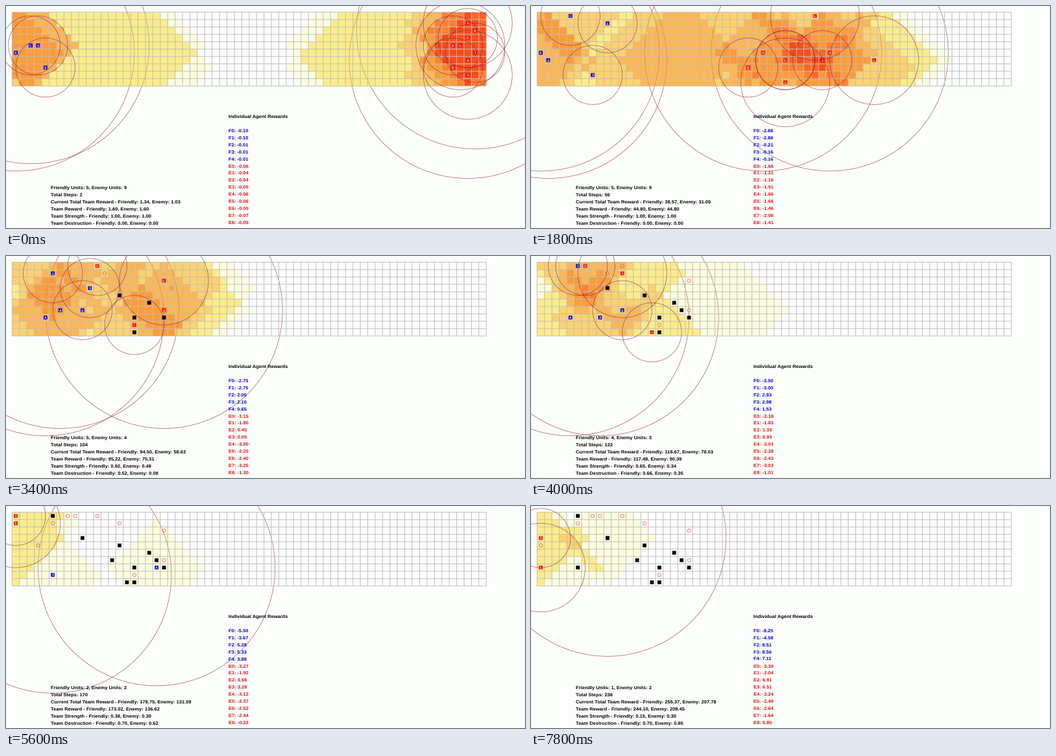
Write a matplotlib script that moves like this. It is 800x343 px and loops after 8 s.

```python
import numpy as np
import matplotlib.pyplot as plt
from matplotlib.animation import FuncAnimation
from matplotlib.collections import LineCollection
from matplotlib.patches import Circle, Rectangle

W, H, DPI = 800, 343, 100
PX = 72 / DPI
COLS, ROWS = 64, 10
X0, Y0, DX, DY = 9.4, 9.6, 11.42, 11.4
FRAMES, INTERVAL = 40, 200
KEYS = [0, 4, 9, 17, 24, 32, 39]

plt.rcParams["font.family"] = "Liberation Sans"
plt.rcParams["text.hinting"] = "none"

RING = {"A": 16, "L": 6, "C": 4, "S": 4, "I": 4}    # drawn circle, in cells
REACH = {"A": 6, "L": 8, "C": 6, "S": 22, "I": 6}   # heat diamond, in cells

BLUE, RED, WINE = "#0000d8", "#f01010", "#8f1a2e"


def heat_colors():
    """RGBA per overlap count: the most transparent colour giving the ramp."""
    n = np.arange(10)
    green = np.interp(n, [1, 2, 5, 8], [255, 237, 157, 78])
    blue = np.interp(n, [0, 1, 2, 5, 8], [255, 224, 139, 56, 24])
    rgb = np.stack([np.full(10, 255), green, blue], axis=1) / 255
    alpha = 1 - rgb.min(axis=1, keepdims=True)
    base = (rgb - (1 - alpha)) / np.maximum(alpha, 1e-9)
    return np.hstack([np.clip(base, 0, 1), alpha])


LUT = heat_colors()


def cell(c, r):
    return X0 + DX * (c + 0.5), Y0 + DY * (r + 0.5)


def along(k, keys, path):
    c, r = np.array(path, float).T
    return int(round(np.interp(k, keys, c))), int(round(np.interp(k, keys, r)))


fig = plt.figure(figsize=(W / DPI, H / DPI), dpi=DPI, facecolor="#fcfefc")
ax = fig.add_axes([0, 0, 1, 1])
ax.axis("off")

right, bottom = X0 + COLS * DX, Y0 + ROWS * DY
heat = ax.imshow(np.zeros((ROWS, COLS, 4)), aspect="auto",
                 interpolation="nearest", zorder=2,
                 extent=(X0, right, bottom, Y0))
ax.set_xlim(0, W)
ax.set_ylim(H, 0)

lines = [[(X0 + i * DX, Y0), (X0 + i * DX, bottom)] for i in range(COLS + 1)]
lines += [[(X0, Y0 + j * DY), (right, Y0 + j * DY)] for j in range(ROWS + 1)]
grid = LineCollection(lines, colors="#bebebe", linewidths=1 * PX, zorder=3)
grid.set_snap(False)
ax.add_collection(grid)


class Unit:
    """Walks key points; a unit that dies does so at its last one."""

    def __init__(self, kind, color, path, death=None, keys=None):
        self.kind, self.color, self.path, self.death = kind, color, path, death
        self.keys = list(keys or KEYS[:len(path)])
        if death is not None:
            self.keys[-1] = death
        self.ring = ax.add_patch(Circle((0, 0), RING[kind] * DX, fill=False,
                                        ec=WINE, lw=0.8 * PX, alpha=0.65,
                                        zorder=1 if kind == "A" else 4))
        self.box = ax.add_patch(Rectangle((0, 0), 5.8, 5.8, lw=0, snap=False))
        self.tag = ax.text(0, 0, kind, color="white", size=5 * PX,
                           weight="bold", ha="center", va="baseline")

    def alive(self, k):
        return self.death is None or k < self.death

    def place(self, k):
        self.c, self.r = along(k, self.keys, self.path)
        x, y = cell(self.c, self.r)
        live = self.alive(k)
        self.ring.center = (x, y)
        self.ring.set_visible(live)
        self.box.set_xy((x - 2.9, y - 2.9))
        self.box.set_facecolor(self.color if live else "black")
        self.box.set_zorder(6 if live else 8)
        self.tag.set_position((x, y + 1.8))
        self.tag.set_visible(live)
        self.tag.set_zorder(6)


friends = [
    Unit("A", BLUE, [(0, 5), (0, 9), (0, 5), (4, 7), (4, 7), (6, 8), (5, 7)], 36),
    Unit("A", BLUE, [(2, 4), (2, 2), (1, 6), (6, 6), (10, 9), (21, 7), (16, 6), (9, 3)],
         keys=[0, 4, 9, 17, 24, 29, 32, 39]),
    Unit("S", BLUE, [(3, 4), (3, 6), (9, 1), (10, 3), (9, 3)], 20),
    Unit("S", BLUE, [(4, 7), (8, 7), (7, 8), (9, 6), (13, 6)], 23),
    Unit("C", BLUE, [(2, 4), (4, 0), (4, 0), (5, 1), (5, 0)], 22),
]
foes = [
    Unit("A", RED, [(62, 2), (48, 0), (39, 5), (20, 6), (20, 6)], 18),
    Unit("A", RED, [(61, 6), (48, 1), (30, 5), (20, 7)], 16),
    Unit("L", RED, [(61, 1), (53, 1), (37, 0), (20, 2), (0, 0), (0, 2), (0, 7)]),
    Unit("L", RED, [(60, 4), (54, 8), (45, 6), (18, 5)], 16),
    Unit("L", RED, [(61, 8), (47, 9), (33, 9), (16, 9)], 14),
    Unit("S", RED, [(59, 7), (44, 7), (28, 7), (16, 7)], 15),
    Unit("S", RED, [(59, 4), (49, 5), (33, 6), (14, 4)], 13),
    Unit("I", RED, [(62, 5), (51, 4), (38, 6), (16, 8), (15, 9)], 21),
    Unit("C", RED, [(61, 3), (48, 7), (33, 6), (11, 0), (0, 0), (0, 0), (0, 3)]),
]
foes[0].path[-1] = (19, 6)
units = friends + foes


class Marker:
    def __init__(self, start, path, keys=(0,)):
        self.start, self.path, self.keys = start, path, keys
        self.dot = ax.add_patch(Circle((0, 0), 2.6, fill=False, ec="#e8453c",
                                       lw=0.8 * PX, alpha=0.85, zorder=5))

    def place(self, k):
        self.dot.center = cell(*along(k, self.keys, self.path))
        self.dot.set_visible(k >= self.start)


markers = [
    Marker(9, [(29, 6), (12, 1), (6, 2), (0, 5), (0, 4)], KEYS[2:]),
    Marker(16, [(22, 3), (21, 3), (20, 2)], (16, 17, 18)),
]
spots = [(20, 6), (11, 0), (16, 8), (14, 1), (8, 0), (7, 0), (5, 1)]
markers += [Marker(18 + i, [spot]) for i, spot in enumerate(spots)]


def label(x, y, color="black", s=""):
    return ax.text(x, y + 2.3, s, color=color, size=7.5 * PX, weight="bold",
                   va="baseline", zorder=9)


# Per agent: score when the sides meet, score after the clash, later rate
GAIN, IDLE, LOSE = 0.2935, -0.011, -0.25
AGENTS = {
    "F0": (-2.86, -2.75, LOSE), "F1": (-2.86, -2.75, LOSE / 3),
    "F2": (-0.21, 2.05, GAIN), "F3": (-0.16, 2.10, GAIN),
    "F4": (-0.16, 0.65, GAIN),
    "E0": (-1.66, -3.15, IDLE), "E1": (-1.21, -1.80, IDLE),
    "E2": (-1.16, 0.45, GAIN), "E3": (-1.51, 0.05, GAIN),
    "E4": (-1.66, -3.00, IDLE), "E5": (-1.66, -2.25, IDLE),
    "E6": (-1.46, -2.40, IDLE), "E7": (-2.06, -3.25, GAIN / 4),
    "E8": (-1.41, -1.30, GAIN / 3),
}


def score(k, meet, clash, rate):
    return np.interp(k, [0, 9, 17], [meet / 28, meet, clash]) + rate * max(0, k - 17)


label(343, 170.5, s="Individual Agent Rewards")
scores = {name: label(343, 192.4 + 10.95 * i, BLUE if name[0] == "F" else "#dc1414")
          for i, name in enumerate(AGENTS)}
stats = [label(68.6, 280.5 + 10.95 * i) for i in range(6)]


def total(k, *marks):
    return np.interp(k, [0, 9, 17, 24, 39], marks)


def pair(title, f, e):
    return f"{title} - Friendly: {f:.2f}, Enemy: {e:.2f}"


def stat_lines(k):
    strong_f = np.interp(k, [9, 17, 23, 35, 36], [1, .92, .38, .38, .15])
    strong_e = np.interp(k, [9, 17, 21], [1, .48, .30])
    n_f = sum(u.alive(k) for u in friends)
    n_e = sum(u.alive(k) for u in foes)
    return [f"Friendly Units: {n_f}, Enemy Units: {n_e}",
            f"Total Steps: {2 + 6 * k}",
            pair("Current Total Team Reward",
                 total(k, 1.34, 38.57, 94.50, 150.89, 255.37),
                 total(k, 1.03, 31.05, 58.63, 103.89, 207.78)),
            pair("Team Reward",
                 total(k, 1.60, 44.80, 95.22, 147.17, 244.10),
                 total(k, 1.60, 44.80, 75.31, 110.50, 208.45)),
            pair("Team Strength", strong_f, strong_e),
            pair("Team Destruction", 1 - strong_e, 1 - strong_f)]


rows, cols = np.mgrid[:ROWS, :COLS]


def draw(k):
    count = np.zeros((ROWS, COLS), int)
    for u in units:
        u.place(k)
        if u.alive(k):
            count += abs(cols - u.c) + abs(rows - u.r) <= REACH[u.kind]
    heat.set_data(LUT[np.minimum(count, len(LUT) - 1)])
    for m in markers:
        m.place(k)
    for name, text in scores.items():
        text.set_text(f"{name}: {score(k, *AGENTS[name]):.2f}")
    for text, line in zip(stats, stat_lines(k)):
        text.set_text(line)
    return []


anim = FuncAnimation(fig, draw, frames=FRAMES, init_func=lambda: draw(0),
                     interval=INTERVAL, repeat=True, repeat_delay=0)
plt.show()
```
